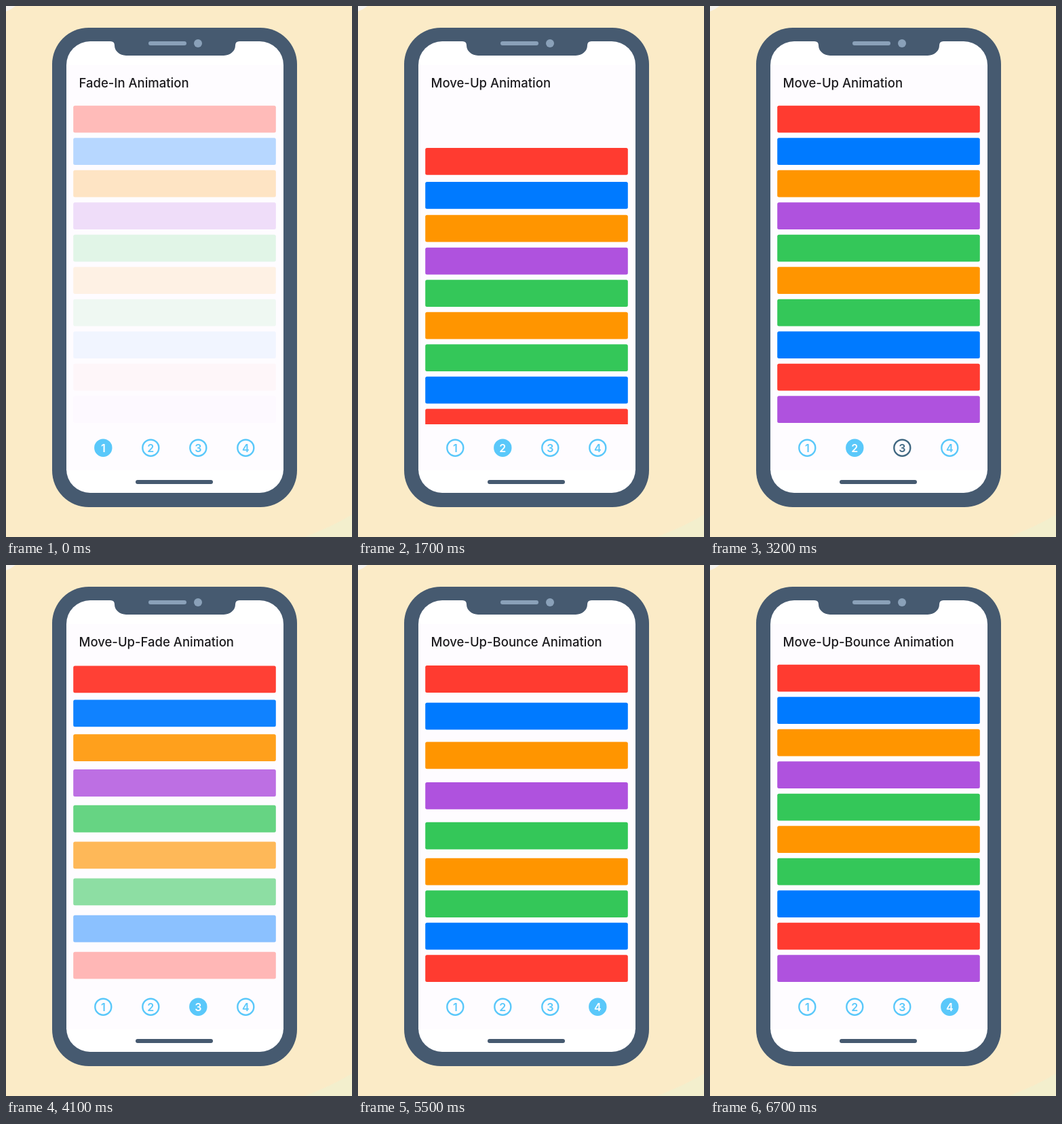
An HTML page for the animation above (6800 ms loop, 510 by 782 pixels).

```html
<!DOCTYPE html>
<html lang="en">
<head>
<meta charset="utf-8">
<title>List animations</title>
<style>
  html, body { margin: 0; width: 100%; height: 100%; overflow: hidden; background: #fbebc7; }
  svg { display: block; width: 100%; height: 100%; }
  text { font-family: Inter, Roboto, sans-serif; }
  #title { font-size: 18.5px; font-weight: 500; fill: #1c1b1e; }
  .digit { font-size: 16px; font-weight: 600; text-anchor: middle; }
</style>
</head>
<body>
<svg viewBox="0 0 510 782">
  <defs>
    <clipPath id="list"><rect x="89" y="130" width="320" height="486"/></clipPath>
  </defs>
  <rect width="510" height="782" fill="#fbebc7"/>
  <path d="M0 0H14Q8 5 0 8Z" fill="#f6f3ee"/>
  <path d="M440 782Q480 767 510 749V782Z" fill="#f3efcd"/>

  <rect x="68" y="32" width="361" height="706" rx="54" fill="#465a70"/>
  <rect x="89" y="52" width="320" height="665" rx="35" fill="#fff"/>
  <rect x="89" y="87" width="320" height="597" fill="#fefcff"/>
  <path d="M154 51V52Q160 52 160 58A17 15 0 0 0 177 73H321A17 15 0 0 0 338 58Q338 52 344 52V51Z" fill="#465a70"/>
  <rect x="210" y="52" width="56" height="6" rx="3" fill="#8aa1b9"/>
  <circle cx="283" cy="55" r="6" fill="#8aa1b9"/>
  <rect x="191" y="698" width="114" height="6" rx="3" fill="#465a70"/>

  <text id="title" x="107.5" y="119.8"></text>
  <g id="rows" clip-path="url(#list)"></g>
  <g id="buttons"></g>
</svg>
<script>
const LOOP = 6800, STEP = 100, DURATION = 850;
const ROW_TOP = 146.8, PITCH = 47.5;
const RED = '#ff3b30', BLUE = '#007aff', ORANGE = '#ff9500', PURPLE = '#af52de', GREEN = '#34c759';
const ROW_COLORS = [RED, BLUE, ORANGE, PURPLE, GREEN, ORANGE, GREEN, BLUE, RED, PURPLE];
const TINT = '#5ac8fa', PRESSED = '#416882';

// from: when the scene appears; start: when its first row begins moving; press: next button held down
const SCENES = [
  { title: 'Fade-In Animation', from: 0, start: -343, press: 1400, delay: 30, shift: 0, fade: true, left: easeLeft },
  { title: 'Move-Up Animation', from: 1600, start: 1548, press: 3200, delay: 50, shift: 1.4, left: easeLeft },
  { title: 'Move-Up-Fade Animation', from: 3400, start: 3348, press: 5100, delay: 50, shift: 1.4, fade: true, left: easeLeft },
  { title: 'Move-Up-Bounce Animation', from: 5300, start: 5249, press: Infinity, delay: 50, shift: 1, left: springLeft },
];

// Remaining fraction of an ease-in-out, cubic-bezier(.42, 0, .58, 1)
function easeLeft(ms) {
  const x = Math.min(1, Math.max(0, ms / DURATION));
  let low = 0, high = 1;
  for (let i = 0; i < 24; i++) {
    const s = (low + high) / 2, r = 1 - s;
    if (1.26 * r * r * s + 1.74 * r * s * s + s * s * s < x) low = s; else high = s;
  }
  return 1 - low * low * (3 - 2 * low);
}

// Remaining fraction of a spring with damping ratio 0.6
function springLeft(ms) {
  const a = Math.max(0, ms) * 0.0105;
  return Math.exp(-0.6 * a) * (Math.cos(0.8 * a) + 0.75 * Math.sin(0.8 * a));
}

function add(parent, tag, attributes) {
  const node = document.createElementNS('http://www.w3.org/2000/svg', tag);
  setAll(node, attributes);
  return parent.appendChild(node);
}

function setAll(node, attributes) {
  for (const name in attributes) node.setAttribute(name, attributes[name]);
}

const title = document.getElementById('title');
const rowGroup = document.getElementById('rows');
const buttonGroup = document.getElementById('buttons');

const rows = ROW_COLORS.map(fill =>
  add(rowGroup, 'rect', { x: 99.2, width: 298.6, height: 39.8, rx: 2.5, fill }));

const buttons = SCENES.map((_, i) => {
  const x = 143.3 + 70 * i;
  const ring = add(buttonGroup, 'circle', { cx: x, cy: 650.7, r: 12, 'stroke-width': 2.4 });
  const digit = add(buttonGroup, 'text', { x, y: 656.5, class: 'digit' });
  digit.textContent = i + 1;
  return { ring, digit };
});

function draw(now) {
  const time = Math.floor((now % LOOP) / STEP) * STEP;
  const active = SCENES.findLastIndex(scene => time >= scene.from);
  const scene = SCENES[active];

  title.textContent = scene.title;
  rows.forEach((row, i) => {
    const left = scene.left(time - scene.start - i * scene.delay);
    setAll(row, {
      y: ROW_TOP + PITCH * (i + scene.shift * left),
      opacity: scene.fade ? 1 - left : 1,
    });
  });
  buttons.forEach(({ ring, digit }, i) => {
    const color = i === active + 1 && time >= scene.press ? PRESSED : TINT;
    const filled = i === active;
    setAll(ring, { stroke: color, fill: filled ? color : 'none' });
    setAll(digit, { fill: filled ? '#fff' : color });
  });
  requestAnimationFrame(() => draw(performance.now()));
}
draw(0);
</script>
</body>
</html>
```
